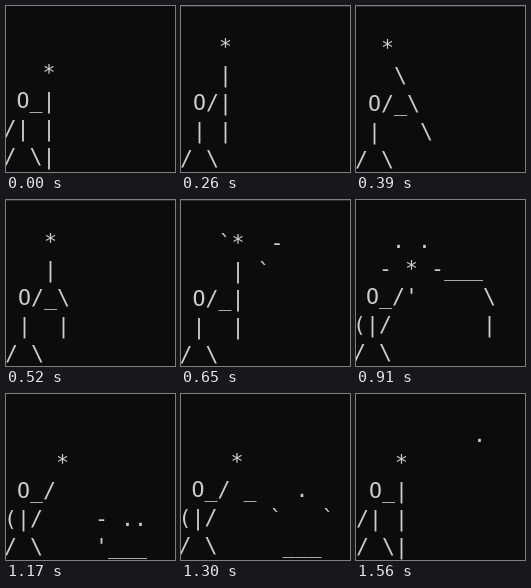
Animation of 169x166 px, one loop 1690 ms. Source, as an HTML page:

```html
<!DOCTYPE html>
<html>
<head>
<meta charset="utf-8">
<style>
html, body { margin: 0; width: 169px; height: 166px; overflow: hidden; background: #0c0c0c; }
pre {
  position: absolute; left: 0; top: 1px; margin: 0; color: #ccc;
  font: 21.6px/28px "DejaVu Sans Mono", monospace; font-variant-ligatures: none;
}
#edge { position: absolute; left: 0; top: 0; width: 169px; height: 1px; background: #2c2c2c; }
</style>
</head>
<body>
<pre id="terminal"></pre>
<div id="edge"></div>
<!-- Each pose: "@ x y edge", then five terminal rows -->
<script type="text/plain" id="poses">
@ -2.5 24 0

   *
 O_|
/| |
/ \|
@ -2 25 1

   *
 O_|
/| |
/ \|
@ -1 26 1
   *
   |
 O/|
 | |
/ \
@ -1 26.5 1
  *
   \
 O/_\
 |   \
/ \
@ -1 27 1
   *
   |
 O/_\
 |  |
/ \
@ -1.5 27.5 1
   `*  -
    | `
 O/_|
 |  |
/ \
@ -2 27 0
    . -
  ` * -
 O_/ '
(|/
/ \
@ -3 26 0
   . .
  - * -___
 O_/'     \
(|/       |
/ \
@ -2.5 26 0

    *   _
 O_/     \
(|/       |
/ \      '_
@ -2 25.5 0

    *
 O_/
(|/    - ..
/ \    '___
@ -2.5 25 0

    *
 O_/ _   .
(|/    `   `
/ \     ___
@ -1 25.5 0

    *    .
 O_/   `
(|/
/ \
@ 0 26 0
         .
   *
 O_|
/| |
/ \|
</script>
<script>
const STEP = 130;
const terminal = document.getElementById("terminal");
const edge = document.getElementById("edge");
const poses = document.getElementById("poses").textContent.split("@ ").slice(1).map(block => {
  const [head, ...rows] = block.split("\n");
  const [x, y, line] = head.split(" ").map(Number);
  return { x, y, line, text: rows.join("\n") };
});

function draw() {
  const pose = poses[Math.floor(performance.now() / STEP) % poses.length];
  terminal.textContent = pose.text;
  terminal.style.transform = `translate(${pose.x}px, ${pose.y}px)`;
  edge.style.opacity = pose.line;
  requestAnimationFrame(draw);
}
draw();
</script>
</body>
</html>
```
